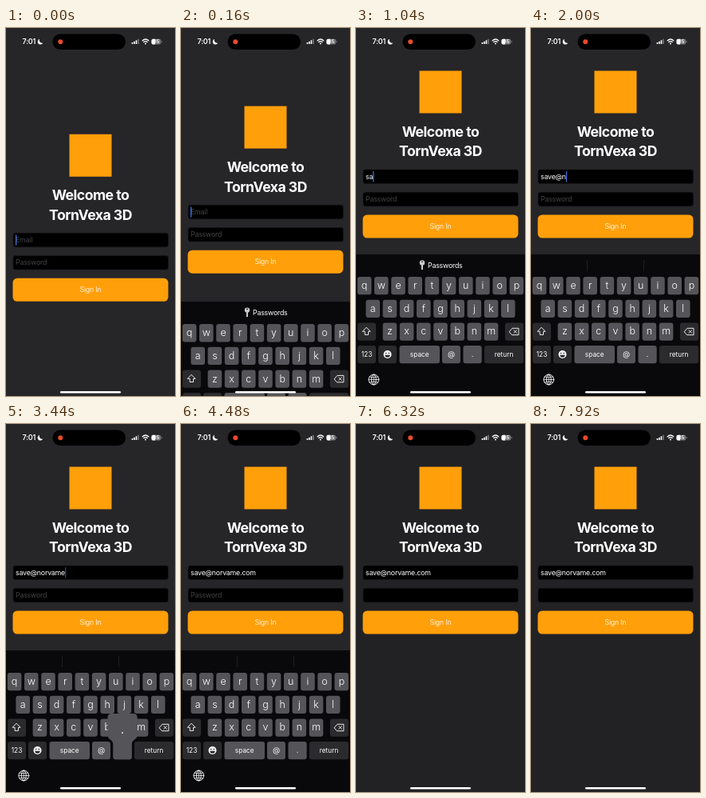
Recreate the animation shown at these times as an HTML page. Size 212 by 460 pixels, loop 8000 ms.

```html
<!DOCTYPE html>
<html lang="en">
<head>
<meta charset="utf-8">
<title>Sign in</title>
<style>
html, body { margin: 0; width: 100%; height: 100%; overflow: hidden; background: #252427; }
svg { display: block; width: 212px; height: 460px; }
text { font-family: Inter, "Liberation Sans", sans-serif; fill: #fff; white-space: pre; }
.mid { text-anchor: middle; }
.title { font-size: 17.7px; font-weight: 700; letter-spacing: -.55px; }
.body { font-size: 8.8px; letter-spacing: -.2px; }
.hint { fill: #444448; }
.field { fill: #000; stroke: #19191b; stroke-width: .6; }
.line { fill: none; stroke: #fff; stroke-width: .9; stroke-linecap: round; stroke-linejoin: round; }
</style>
</head>
<body>
<svg viewBox="0 0 212 460">
  <rect id="bg" width="212" height="460"/>

  <g id="form">
    <rect x="79.5" y="53.5" width="53" height="53" fill="#ff9f0a"/>
    <text class="title mid" x="106" y="135.6">Welcome to</text>
    <text class="title mid" x="106" y="160.4">TornVexa 3D</text>
    <rect class="field" x="9" y="177" width="194.5" height="17.5" rx="2.8"/>
    <rect class="field" x="9" y="205.3" width="194.5" height="17.5" rx="2.8"/>
    <text id="emailHint" class="body hint" x="12" y="189">Email</text>
    <text id="email" class="body" x="12" y="189"></text>
    <rect id="caret" y="179" width="1.2" height="13.6" rx=".6" fill="#3b76ea"/>
    <text id="passHint" class="body hint" x="12" y="217.2">Password</text>
    <rect x="8.5" y="233.5" width="195" height="29" rx="5.5" fill="#ff9f0a"/>
    <text class="body mid" x="106" y="251.2" style="fill:#fff1d6">Sign In</text>
  </g>

  <g id="board">
    <rect y="283" width="212" height="180" fill="#09080b"/>
    <g id="passBar">
      <g transform="translate(83 293.5)">
        <circle r="3.2" fill="#c9c9cc"/>
        <circle cy="-1.2" r=".8" fill="#09080b"/>
        <path d="M-1 2.5H1V8L0 9L-1 8Z" fill="#c9c9cc"/>
      </g>
      <text class="body" x="90" y="300.2">Passwords</text>
    </g>
    <path id="splits" d="M70.5 290V304M141.5 290V304" stroke="#29292c" stroke-width=".7"/>
    <g id="keys"></g>
    <g class="line">
      <path d="M13.3 374.5L18 379.3H15.5V383.4H11.1V379.3H8.6Z"/>
      <path d="M192.5 379.5L196 375.3H204V383.7H196ZM198 377.8L201.5 381.2M201.5 377.8L198 381.2"/>
    </g>
    <g transform="translate(39.5 408)">
      <circle r="5" fill="#fff"/>
      <ellipse cx="-1.8" cy="-1.4" rx=".7" ry="1.1" fill="#2b2a2d"/>
      <ellipse cx="1.8" cy="-1.4" rx=".7" ry="1.1" fill="#2b2a2d"/>
      <path d="M-3.2 .8H3.2A3.2 3 0 0 1 -3.2 .8Z" fill="#2b2a2d"/>
    </g>
    <g class="line" transform="translate(22.3 439.5)">
      <circle r="6.4"/>
      <ellipse rx="2.9" ry="6.4"/>
      <path d="M-6.4 0H6.4M0 -6.4V6.4M-5.3 -3.4Q0 -1.6 5.3 -3.4M-5.3 3.4Q0 1.6 5.3 3.4" stroke-width=".7"/>
    </g>
    <g id="callout">
      <path id="bubble" fill="#555458"/>
      <text id="bubbleText" class="mid" style="font-size:18px;font-weight:300"></text>
    </g>
  </g>

  <g id="status">
    <text x="20.5" y="20.3" style="font-size:9px;font-weight:600;letter-spacing:-.25px">7:01</text>
    <path d="M42 13.8A3.5 3.5 0 1 0 46.3 18.7A3.6 3.6 0 0 1 42 13.8Z" fill="#fff"/>
    <rect x="58.5" y="7.5" width="91.5" height="19.5" rx="9.75"/>
    <circle cx="68.3" cy="17.2" r="3" fill="#ea4a2c"/>
    <path d="M158.5 18V20M161 16.8V20M163.5 15.3V20" stroke="#fff" stroke-width="1.6"/>
    <path d="M166 13.8V20" stroke="#77767a" stroke-width="1.6"/>
    <g class="line" stroke-linecap="butt">
      <path d="M171.2 15.7Q175 12.3 178.8 15.7" stroke-width="1.3"/>
      <path d="M172.8 17.6Q175 15.7 177.2 17.6" stroke-width="1.3"/>
    </g>
    <circle cx="175" cy="19.4" r="1" fill="#fff"/>
    <rect x="182.5" y="13.8" width="11.8" height="6.6" rx="2" fill="#77767a"/>
    <path d="M187 13.8H184.5A2 2 0 0 0 182.5 15.8V18.4A2 2 0 0 0 184.5 20.4H187Z" fill="#fff"/>
    <path d="M195.2 16V18.2" stroke="#77767a"/>
    <text class="mid" x="188.6" y="19.3" style="font-size:6px;font-weight:600">35</text>
  </g>
  <rect x="68" y="453.9" width="76" height="2.5" rx="1.25" fill="#fff"/>
</svg>
<script>
const LOOP = 8000;
const EMAIL = "save@norvame.com";
// Moment each character lands in the field.
const TYPED = [720, 960, 1280, 1440, 1680, 1920, 2160, 2400, 2720, 2880, 3040, 3200, 3520, 3760, 3920, 4240];
const HOLD = 110;
const RISE = 79.3, BOARD = 177, START = 50;
const BLUR = 4480, SECURE = 4640, FILLED = 5840, SUGGEST = 1120;
const KEY_H = 22.3;

const $ = id => document.getElementById(id);
const el = Object.fromEntries([...document.querySelectorAll("[id]")].map(n => [n.id, n]));
const keys = {};

function make(parent, tag, attrs, label = "") {
  const node = document.createElementNS("http://www.w3.org/2000/svg", tag);
  for (const name in attrs) node.setAttribute(name, attrs[name]);
  node.textContent = label;
  parent.append(node);
  return node;
}

function addKey(label, x, y, w, size, fill = "#555458") {
  make($("keys"), "rect", { x, y, width: w, height: KEY_H, rx: 3, fill });
  const text = make($("keys"), "text", {
    x: x + w / 2, y: y + KEY_H / 2 + size * .31, class: "mid",
    style: `font-size:${size}px;font-weight:${size > 10 ? 300 : 400}`
  }, label);
  keys[label] = { x, y, w, text };
}

function buildKeys() {
  const dark = "#2b2a2d";
  ["qwertyuiop", "asdfghjkl", "zxcvbnm"].forEach((row, r) => {
    const left = [1.8, 12.4, 33.6][r];
    [...row].forEach((c, i) => addKey(c, left + i * 21.2, 311 + r * 28.7, 17.6, 12.5));
  });
  addKey("", 2, 368.4, 23, 9, dark);
  addKey("", 187, 368.4, 23.2, 9, dark);
  addKey("123", 2, 397, 23, 8.3, dark);
  addKey("", 28, 397, 23, 9, dark);
  addKey("space", 54.5, 397, 50.5, 8.3);
  addKey("@", 108, 397, 23, 9.5);
  addKey(".", 134.5, 397, 23.2, 9.5);
  addKey("return", 161, 397, 49.2, 8.3, dark);
}

function calloutPath({ x, y, w }) {
  const l = Math.max(1, x - 7), r = Math.min(211, x + w + 7);
  const top = y - 35, mid = y - 8, bottom = y + KEY_H;
  return `M${l + 5} ${top}H${r - 5}Q${r} ${top} ${r} ${top + 5}V${mid}` +
    `C${r} ${mid + 6} ${x + w} ${mid + 5} ${x + w} ${y + 4}V${bottom - 3}` +
    `Q${x + w} ${bottom} ${x + w - 3} ${bottom}H${x + 3}Q${x} ${bottom} ${x} ${bottom - 3}` +
    `V${y + 4}C${x} ${mid + 5} ${l} ${mid + 6} ${l} ${mid}V${top + 5}Q${l} ${top} ${l + 5} ${top}Z`;
}

// Critically damped spring: 1 at rest before start, falling to 0.
function settle(t, rate) {
  const x = Math.max(0, t - START) * rate;
  return (1 + x) * Math.exp(-x);
}

const show = (node, on) => node.setAttribute("visibility", on ? "visible" : "hidden");
const shift = (node, y) => node.setAttribute("transform", `translate(0 ${y.toFixed(2)})`);

function drawCallout(t) {
  const index = TYPED.findIndex(at => t >= at - HOLD && t < at);
  const key = index < 0 ? null : keys[EMAIL[index]];
  for (const k in keys) keys[k].text.setAttribute("opacity", keys[k] === key ? 0 : 1);
  el.callout.setAttribute("display", key ? "inline" : "none");
  if (key) {
    el.bubble.setAttribute("d", calloutPath(key));
    el.bubbleText.textContent = EMAIL[index];
    el.bubbleText.setAttribute("x", key.x + key.w / 2);
    el.bubbleText.setAttribute("y", key.y - 10.5);
  }
  return key;
}

function draw(t) {
  const count = TYPED.filter(at => t >= at).length;
  el.bg.setAttribute("fill", t < SECURE ? "#262528" : "#222224");
  shift(el.form, RISE * settle(t, .01355));
  shift(el.board, BOARD * settle(t, .0206));
  el.board.setAttribute("display", t < SECURE ? "inline" : "none");
  show(el.passBar, t < SUGGEST);
  show(el.splits, t >= SUGGEST);

  el.email.textContent = EMAIL.slice(0, count);
  show(el.emailHint, !count);
  show(el.passHint, t < FILLED);

  const held = drawCallout(t);
  const width = count ? el.email.getComputedTextLength() : 0;
  el.caret.setAttribute("x", 12 + width);
  el.caret.setAttribute("opacity", held ? .65 : 1);
  show(el.caret, t < BLUR);
}

buildKeys();
const begin = performance.now();
function tick() {
  draw((performance.now() - begin) % LOOP);
  requestAnimationFrame(tick);
}
tick();
</script>
</body>
</html>
```
